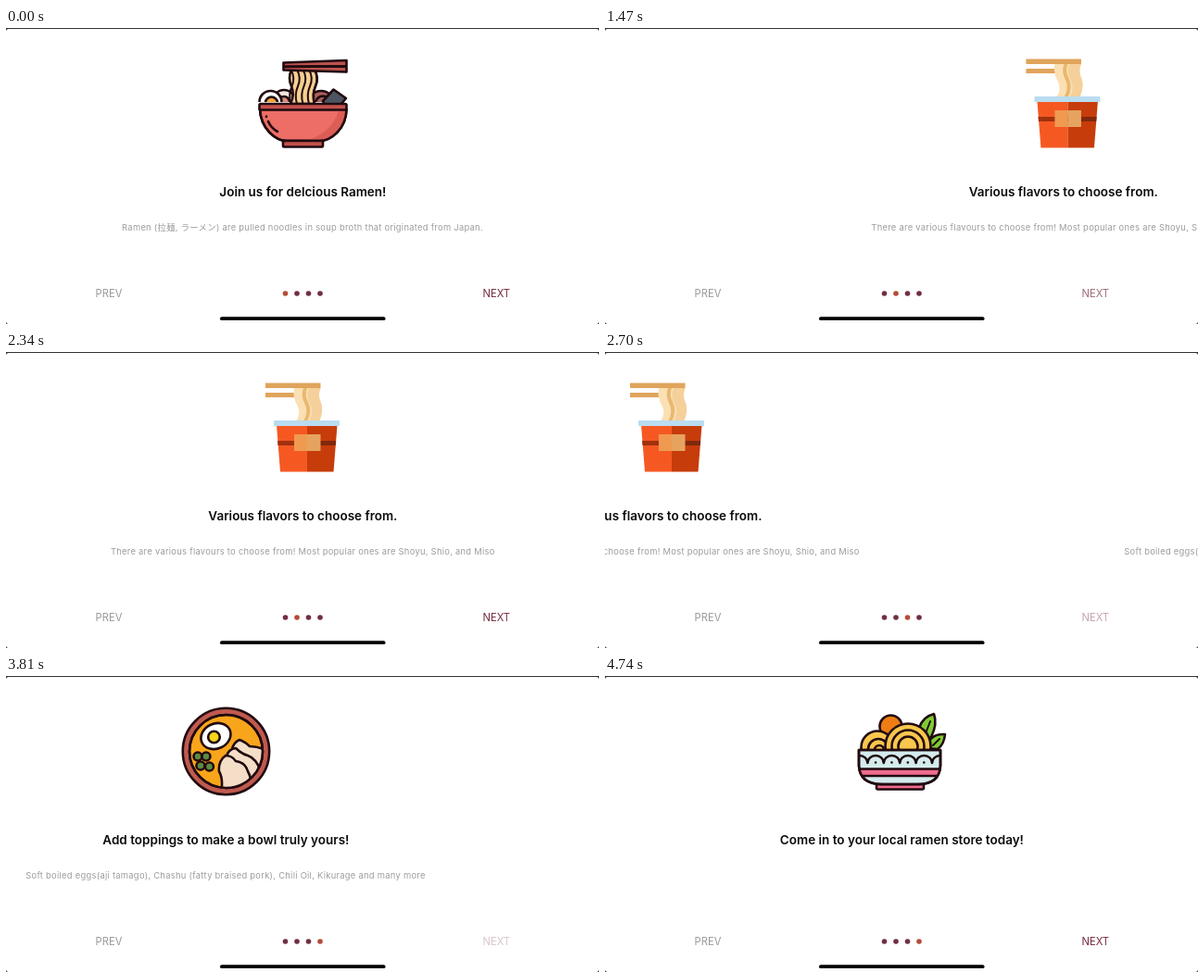
An HTML page that plays this animation: 640 px wide and 320 px high, repeating every 4.77 s.

```html
<!DOCTYPE html>
<html lang="en">
<head>
<meta charset="utf-8">
<title>Ramen onboarding</title>
<style>
  html, body { margin: 0; width: 100%; height: 100%; overflow: hidden; background: #333; }
  svg { display: block; width: 640px; height: 320px; }
  text { font: 11.2px Inter, "Noto Sans CJK JP", "Noto Sans CJK", sans-serif; text-anchor: middle; fill: #999; }
  .title { font-size: 13.5px; font-weight: 600; fill: #0c0c0c; }
  .info { font-size: 9.4px; letter-spacing: .27px; fill: #9c9c9c; }
  .ink { stroke: #210b10; stroke-width: 2.6; stroke-linejoin: round; stroke-linecap: round; }
  .line { fill: none; }
</style>
</head>
<body>
<svg viewBox="0 0 640 320">
  <defs>
    <clipPath id="soup"><circle cx="320.5" cy="81.5" r="40"/></clipPath>
    <clipPath id="bowl"><path d="M274 80H362V97Q361 117 338 117H299Q275 117 274 97Z"/></clipPath>
    <clipPath id="red"><path d="M274 88C275 109 291 122 303 122H338C351 122 367 109 367.500 88Z"/></clipPath>
    <clipPath id="above"><path d="M260 30H380V80H260Z"/></clipPath>
  </defs>

  <rect y="1" width="640" height="319" rx="3" fill="#fff"/>

  <g class="page">
    <g class="ink">
      <g clip-path="url(#above)">
        <circle cx="300" cy="79" r="12" fill="#f3e6df"/>
        <circle cx="300" cy="80" r="6" fill="#d9897c"/>
        <circle cx="285.500" cy="80" r="12" fill="#fff"/>
        <circle cx="286.500" cy="81" r="6.500" fill="#f5a13c"/>
        <circle cx="340" cy="82" r="14" fill="#a9625c"/>
        <path d="M334 80Q337 72 345 74" class="line"/>
      </g>
      <path d="M342 79L353.500 66.500L367 76L361 83H344Z" fill="#4d5563"/>
      <path id="noodles" fill="#f6cf92"/>
      <path id="strands" class="line" stroke-width="2"/>
      <path d="M299.500 37.500L367.500 35V41L299.500 41.500ZM299.500 42L367.500 41.500V47.500L299.500 45.500Z" fill="#bd524e"/>
      <path d="M274 88C275 109 291 122 303 122H338C351 122 367 109 367.500 88Z" fill="#ec6e66"/>
    </g>
    <path d="M359 88Q354 112 324 122H342L369 110V88Z" fill="#dc5d56" clip-path="url(#red)"/>
    <g class="ink">
      <path d="M274 88C275 109 291 122 303 122H338C351 122 367 109 367.500 88M281 95.500V96M283 101Q286 108 293 112" class="line"/>
      <rect x="273.500" y="82" width="94" height="6.500" rx="1.500" fill="#c2524c"/>
      <rect x="299" y="122" width="43" height="6.500" rx="1" fill="#c2524c"/>
    </g>
    <text class="title" x="320.400" y="181.500">Join us for delcious Ramen!</text>
    <text class="info" x="320" y="218.500">Ramen (拉麺, ラーメン) are pulled noodles in soup broth that originated from Japan.</text>
  </g>

  <g class="page">
    <path d="M280 33.500H339.500V39H280ZM280 44H314V49H280Z" fill="#e0a45c"/>
    <path d="M311 39H339.500Q336 47 340 55Q343 64 338 75H313Q319 66 314 57Q309 48 311 39Z" fill="#fbe0b3"/>
    <path d="M327 39H339.500Q336 47 340 55Q343 64 338 75H327Q333 65 328 56Q323 47 327 39Z" fill="#f5d09a"/>
    <path d="M321 39H325Q322 47 326 54Q331 64 325 75H321Q327 64 322 55Q318 47 321 39Z" fill="#e9b870"/>
    <path d="M292 79H325V129.500H296Z" fill="#f65822"/>
    <path d="M325 79H357.500L353.500 129.500H325Z" fill="#c73c0b"/>
    <path d="M293 96H325V101H293.500Z" fill="#a1310f"/>
    <path d="M325 96H356.200L355.800 101H325Z" fill="#80280c"/>
    <path d="M311 89H325V107H311Z" fill="#ef9a50"/>
    <path d="M325 89H339.500V107H325Z" fill="#e6a360"/>
    <rect x="289" y="74" width="71" height="6" rx="1" fill="#b9dcf0"/>
    <text class="title" x="320.400" y="181.500">Various flavors to choose from.</text>
    <text class="info" x="320.300" y="218.500">There are various flavours to choose from! Most popular ones are Shoyu, Shio, and Miso</text>
  </g>

  <g class="page">
    <g class="ink">
      <circle cx="320.500" cy="81.500" r="46.700" fill="#c05a4f"/>
      <circle cx="320.500" cy="81.500" r="39.500" fill="#f9a51b"/>
      <g clip-path="url(#soup)" fill="#f5dec8">
        <path d="M327 80Q328 72 335 69Q341 71 346 76Q354 76 364 80V125H340Z"/>
        <path d="M321 87Q323 79 331 78Q337 84 344 86Q353 89 358 103V125H335Z"/>
        <path d="M315 126Q318 112 313 103Q312 92 320 86Q327 86 331 92Q341 93 344 103Q349 112 348 126Z"/>
      </g>
      <ellipse cx="309.500" cy="65" rx="16.500" ry="13.500" transform="rotate(-25 309.500 65)" fill="#fff"/>
      <circle cx="307.500" cy="66" r="6.300" fill="#f8d41c"/>
      <g fill="#5d8b42">
        <circle cx="290" cy="87" r="4.500"/><circle cx="299" cy="87" r="4.500"/>
        <circle cx="293" cy="97" r="4.500"/><circle cx="302.500" cy="98" r="4.500"/>
      </g>
      <circle cx="320.500" cy="81.500" r="39.500" class="line"/>
    </g>
    <text class="title" x="320.400" y="181.500">Add toppings to make a bowl truly yours!</text>
    <text class="info" x="320" y="218.500">Soft boiled eggs(aji tamago), Chashu (fatty braised pork), Chili Oil, Kikurage and many more</text>
  </g>

  <g class="page">
    <g class="ink">
      <circle cx="308.500" cy="54.500" r="12" fill="#ee7d14"/>
      <path d="M339 56Q343 44 355 41Q359 52 352 66L344 70Z" fill="#7fca35"/>
      <path d="M347 78Q350 62 367 63Q366 74 359 79Z" fill="#7fca35"/>
      <path d="M351 49L346 62M361 68L354 75" class="line" stroke-width="2"/>
      <g clip-path="url(#above)" fill="#f9c64d">
        <circle cx="294" cy="77" r="17.500"/><circle cx="295" cy="79" r="11"/><circle cx="296" cy="80" r="5"/>
        <circle cx="327" cy="76" r="24.500"/><circle cx="327" cy="76" r="17.500"/><circle cx="327" cy="76" r="10.500"/>
      </g>
      <rect x="293" y="117" width="51" height="5.500" rx="1.500" fill="#f06c8f"/>
      <path d="M274 80H362V97Q361 117 338 117H299Q275 117 274 97Z" fill="#d3eced"/>
    </g>
    <g clip-path="url(#bowl)">
      <path d="M270 101H366V107.500H270Z" fill="#f06c8f"/>
      <g class="ink line">
        <path d="M274 100.500H362M275 108H361"/>
        <path d="M266 94a8.700 8 0 0 1 17.400 0a8.700 8 0 0 1 17.400 0a8.700 8 0 0 1 17.400 0a8.700 8 0 0 1 17.400 0a8.700 8 0 0 1 17.400 0a8.700 8 0 0 1 17.400 0"/>
        <path d="M292 93.500h.1m17.300 0h.1m17.300 0h.1m17.300 0h.1"/>
      </g>
    </g>
    <path class="ink line" d="M274 80H362V97Q361 117 338 117H299Q275 117 274 97Z"/>
    <text class="title" x="320.400" y="181.500">Come in to your local ramen store today!</text>
  </g>

  <text x="111" y="291">PREV</text>
  <text id="next" x="529.300" y="291" style="fill:#762c3f">NEXT</text>
  <g id="dots">
    <circle cx="301.500" cy="287" r="2.800"/><circle cx="314" cy="287" r="2.800"/>
    <circle cx="326.500" cy="287" r="2.800"/><circle cx="339" cy="287" r="2.800"/>
  </g>
  <rect x="231" y="312.300" width="178.500" height="3.800" rx="1.900"/>
</svg>
<script>
  const LOOP = 4770, PAGE_STEP = 709, SLIDE = 300, HOLD = 100, RECOVER = 350;
  const taps = [1268, 2580, 3747];
  const pages = document.querySelectorAll('.page');
  const dots = document.querySelectorAll('#dots circle');
  const next = document.getElementById('next');

  const ease = p => {
    p = Math.min(1, Math.max(0, p));
    return p * p * (3 - 2 * p);
  };

  const wave = x => `M${x} 45q5 9 1 18t-1 19`;
  document.getElementById('noodles').setAttribute('d', 'M308 45H333q5 9 1 18t-1 19H307q5 -10 1 -19t0 -18Z');
  document.getElementById('strands').setAttribute('d', [307.5, 314, 320.5, 327, 333].map(wave).join(''));

  function draw(now) {
    const t = now % LOOP;
    const scroll = taps.reduce((sum, tap) => sum + ease((t - tap) / SLIDE), 0) * PAGE_STEP;
    const current = taps.filter(tap => t >= tap).length;
    const press = taps.findLast(tap => t >= tap - HOLD);

    pages.forEach((page, i) => page.setAttribute('transform', `translate(${i * PAGE_STEP - scroll})`));
    dots.forEach((dot, i) => dot.setAttribute('fill', i === current ? '#b44c39' : '#702f42'));
    next.setAttribute('opacity', press === undefined ? 1 : 0.2 + 0.8 * ease((t - press) / RECOVER));
    requestAnimationFrame(draw);
  }
  draw(performance.now());
</script>
</body>
</html>
```
